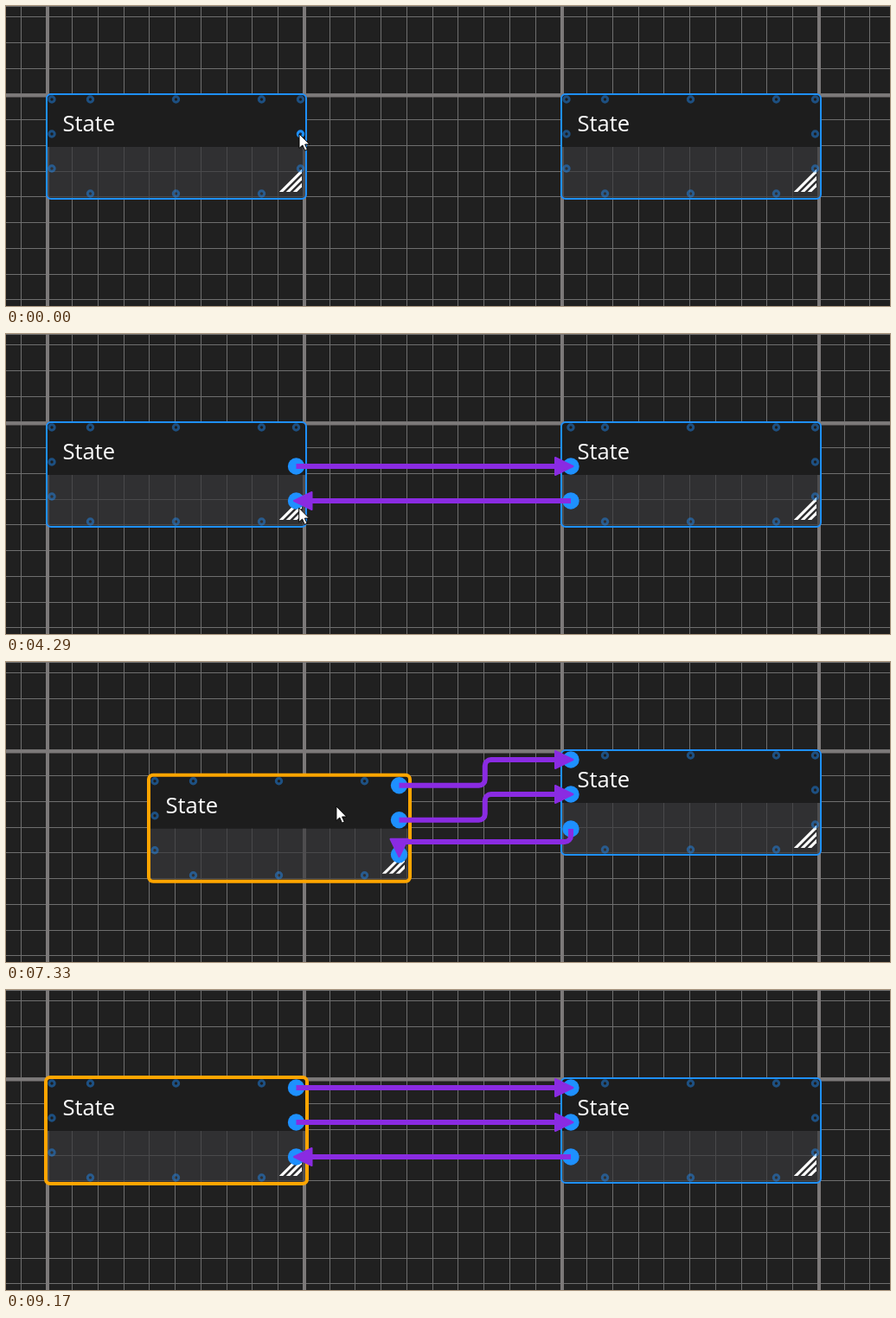
These frames come from a looping animation (1022x347 px, 9440 ms). An HTML page with a canvas:

```html
<!DOCTYPE html>
<html lang="en">
<head>
<meta charset="utf-8">
<title>State connections</title>
<style>
  html, body { margin: 0; width: 100%; height: 100%; overflow: hidden; background: #202020; }
  canvas { display: block; width: 1022px; height: 347px; }
</style>
</head>
<body>
<canvas id="stage" width="1022" height="347"></canvas>
<script>
const ctx = document.getElementById('stage').getContext('2d');
const W = 1022, H = 347, LOOP = 9440, CELL = 29.75, STEP = 84.1;
const BLUE = '#1e90ff', VIOLET = '#8a2be2', ORANGE = '#ffa500';
const HOME = { x: 339, y: 148 }, GRAB = { x: 262, y: 136 };
const LEFT_X = 47, RIGHT_X = 642, NODE_Y = 102;

// Pointer strokes: start, end, then [progress, x, y] waypoints from the previous stop.
const strokes = [
  [440, 440, [1, 339, 146]],
  [710, 1460, [.65, 632, 163], [1, 648, 152]],
  [1830, 2220, [1, 652, 192]],
  [2490, 2580, [1, 652, 188]],
  [2850, 3650, [.455, 351, 191], [.6, 330, 191], [1, 335, 190]],
  [4200, 4900, [.3, 340, 205], [.8, 337, 120], [1, 335, 107]],
  [5080, 5850, [.4, 644, 119], [.6, 666, 114], [1, 654, 110]],
  [6220, 7100, [.545, 260, 116], [.7, 262, 136], [1, 290, 168]],
  [7180, 8040, [.273, 382, 167], [.5, 385, 100], [.75, 300, 95], [.91, 262, 193], [1, 264, 190]],
  [8130, 8360, [1, 264, 128]],
  [8540, 9170, [.875, 976, 330], [1, 1010, 380]]
];

// Links by port row; a reverse link runs from the right node to the left one.
const links = [
  { row: 1, drag: 710, made: 1830 },
  { row: 2, drag: 2850, made: 4200, reverse: true },
  { row: 0, drag: 5080, made: 6220 }
];
const SELECT_AT = 6830, RELEASE_AT = 8500;

function pointerAt(t) {
  let from = [0, HOME.x, HOME.y];
  for (const [start, end, ...points] of strokes) {
    if (t < start) break;
    const gaps = Math.round((end - start) / STEP);
    const step = gaps ? Math.min(gaps, Math.floor((t - start) / (end - start) * gaps + .28)) : 0;
    const u = (step + 1) / (gaps + 1);
    from = [0, from[1], from[2]];
    for (const to of points) {
      if (u < to[0]) {
        const k = (u - from[0]) / (to[0] - from[0]);
        return { x: from[1] + (to[1] - from[1]) * k, y: from[2] + (to[2] - from[2]) * k };
      }
      from = to;
    }
  }
  return { x: from[1], y: from[2] };
}

function offsetAt(t, p) {
  if (t < SELECT_AT || t >= RELEASE_AT) return { x: 0, y: 0 };
  const snap = d => Math.trunc(d / CELL) * CELL;
  return { x: snap(p.x - GRAB.x), y: snap(p.y - GRAB.y) };
}

function drawGrid() {
  ctx.fillStyle = '#202020';
  ctx.fillRect(0, 0, W, H);
  ctx.fillStyle = '#6e6e6e';
  for (let x = 46.75 - CELL; x < W; x += CELL) ctx.fillRect(Math.floor(x), 0, 1, H);
  for (let y = 101.75 - 3 * CELL; y < H; y += CELL) ctx.fillRect(0, Math.floor(y), W, 1);
  ctx.fillRect(0, 0, W, 1);
  ctx.fillStyle = '#7c7979';
  for (let x = 46; x < W; x += CELL * 10) ctx.fillRect(Math.floor(x), 0, 4, H);
  ctx.fillRect(0, 101.5, W, 4);
}

function disc(x, y, r, color) {
  ctx.fillStyle = color;
  ctx.beginPath();
  ctx.arc(x, y, r, 0, 7);
  ctx.fill();
}

function ring(x, y, bright) {
  if (bright) disc(x, y, 3, '#1d2a3a');
  ctx.globalAlpha = bright ? 1 : .45;
  ctx.strokeStyle = BLUE;
  ctx.lineWidth = 3;
  ctx.beginPath();
  ctx.arc(x, y, 3.2, 0, 7);
  ctx.stroke();
  ctx.globalAlpha = 1;
}

function drawGrip(x, y) {
  ctx.save();
  ctx.beginPath();
  ctx.rect(x + 269, y + 87, 26, 26);
  ctx.clip();
  ctx.strokeStyle = '#fff';
  ctx.lineWidth = 3.2;
  for (let d = 24; d > 0; d -= 8) {
    ctx.beginPath();
    ctx.moveTo(x + 292 - d, y + 116);
    ctx.lineTo(x + 298, y + 110 - d);
    ctx.stroke();
  }
  ctx.restore();
}

function drawNode(x, y, selected) {
  ctx.save();
  ctx.beginPath();
  ctx.roundRect(x, y, 300, 121, 5);
  ctx.clip();
  ctx.fillStyle = '#1d1d1d';
  ctx.fillRect(x, y, 300, 61);
  ctx.fillStyle = 'rgba(56,56,59,.68)';
  ctx.fillRect(x, y + 61, 300, 60);
  ctx.restore();
  const grow = selected ? 1 : 0;
  ctx.strokeStyle = selected ? ORANGE : BLUE;
  ctx.lineWidth = selected ? 4 : 2;
  ctx.beginPath();
  ctx.roundRect(x - grow, y - grow, 300 + 2 * grow, 121 + 2 * grow, 5);
  ctx.stroke();
  ctx.fillStyle = '#fff';
  ctx.font = '25.6px "Open Sans", "Noto Sans", sans-serif';
  ctx.fillText('State', x + 18.5, y + 43);
  drawGrip(x, y);
}

function drawPorts(x, y, rightNode, made, pointer, source) {
  const small = (px, py) => ring(px, py, Math.hypot(px - pointer.x, py - pointer.y) < 6);
  for (let dx = 50.5; dx < 250; dx += 99) {
    small(x + dx, y + 6);
    small(x + dx, y + 115);
  }
  const inset = made.length ? 11 : 6;
  const innerX = rightNode ? x + inset : x + 299.5 - inset;
  for (let row = 0; row < 3; row++) {
    const py = y + 6 + row * 40;
    small(rightNode ? x + 293.5 : x + 6, py);
    if (made.some(l => l.row === row)) disc(innerX, py + 5, 9.7, BLUE);
    else if (source === row) ring(innerX, py, true);
    else small(innerX, py);
  }
}

function strokePath(points) {
  ctx.beginPath();
  ctx.moveTo(...points[0]);
  for (let i = 1; i < points.length - 1; i++) ctx.arcTo(...points[i], ...points[i + 1], 7);
  ctx.lineTo(...points[points.length - 1]);
  ctx.stroke();
}

function drawHead(x, y, dx, dy) {
  ctx.save();
  ctx.translate(x, y);
  ctx.rotate(Math.atan2(dy, dx));
  ctx.lineWidth = 2;
  ctx.lineJoin = 'round';
  ctx.beginPath();
  ctx.moveTo(2.5, 0);
  ctx.lineTo(-18, -10);
  ctx.lineTo(-18, 10);
  ctx.closePath();
  ctx.fill();
  ctx.stroke();
  ctx.restore();
}

function drawLink(link, off) {
  const py = NODE_Y + 11 + link.row * 40;
  const left = [335.5 + off.x, py + off.y], right = [653, py];
  const [a, b] = link.reverse ? [right, left] : [left, right];
  const dy = Math.sign(b[1] - a[1]);
  const vertical = link.reverse && dy !== 0;
  const dir = vertical ? [0, dy] : [link.reverse ? -1 : 1, 0];
  const end = [b[0] - dir[0] * 10, b[1] - dir[1] * 10];
  const midX = (a[0] + b[0]) / 2, midY = (a[1] + b[1]) / 2;
  const bends = !dy ? [] : vertical ? [[a[0], midY], [b[0], midY]] : [[midX, a[1]], [midX, b[1]]];
  ctx.strokeStyle = ctx.fillStyle = VIOLET;
  ctx.lineWidth = 6;
  strokePath([a, ...bends, end]);
  drawHead(...b, ...dir);
}

function drawDashed(link, anyMade, p) {
  const inset = anyMade ? 11 : 6;
  const x = link.reverse ? RIGHT_X + inset : LEFT_X + 299.5 - inset;
  ctx.strokeStyle = BLUE;
  ctx.lineWidth = 6;
  ctx.setLineDash([23.8, 23.8]);
  strokePath([[x, NODE_Y + 6 + link.row * 40], [p.x, p.y]]);
  ctx.setLineDash([]);
}

function drawArrowCursor() {
  const shape = new Path2D('M0 0V16.5L3.8 13L6.6 19.2L9.4 18L6.7 12H11.8Z');
  ctx.fillStyle = '#fff';
  ctx.strokeStyle = '#000';
  ctx.lineWidth = 1;
  ctx.fill(shape);
  ctx.stroke(shape);
}

function drawMoveCursor() {
  const arm = new Path2D('M0 0H8M6.5 -3L9.5 0L6.5 3');
  ctx.lineJoin = 'round';
  for (const [color, width] of [['#000', 4], ['#fff', 1.6]]) {
    ctx.strokeStyle = color;
    ctx.lineWidth = width;
    for (let i = 0; i < 4; i++) {
      ctx.rotate(Math.PI / 2);
      ctx.stroke(arm);
    }
  }
}

function drawPointer(p, t, linking) {
  const held = t >= SELECT_AT && t < RELEASE_AT;
  const over = [LEFT_X, RIGHT_X].some(x =>
    p.x > x + 20 && p.x < x + 275 && p.y > NODE_Y && p.y < NODE_Y + 121);
  ctx.save();
  ctx.translate(p.x, p.y);
  if (over && !held && !linking) drawMoveCursor();
  else drawArrowCursor();
  ctx.restore();
}

function draw(t) {
  const p = pointerAt(t), off = offsetAt(t, p);
  const made = links.filter(l => t >= l.made);
  const pending = links.find(l => t >= l.drag && t < l.made);
  const x = LEFT_X + off.x, y = NODE_Y + off.y;
  const sourceRow = reverse => pending && !!pending.reverse === reverse ? pending.row : -1;
  // The dashed line stays only while the pointer drags it.
  drawGrid();
  drawNode(RIGHT_X, NODE_Y, false);
  drawNode(x, y, t >= SELECT_AT);
  if (pending) drawDashed(pending, made.length > 0, p);
  drawPorts(RIGHT_X, NODE_Y, true, made, p, sourceRow(true));
  drawPorts(x, y, false, made, p, sourceRow(false));
  made.forEach(l => drawLink(l, off));
  drawPointer(p, t, !!pending);
}

function tick() {
  draw(performance.now() % LOOP);
  requestAnimationFrame(tick);
}
tick();
</script>
</body>
</html>
```
